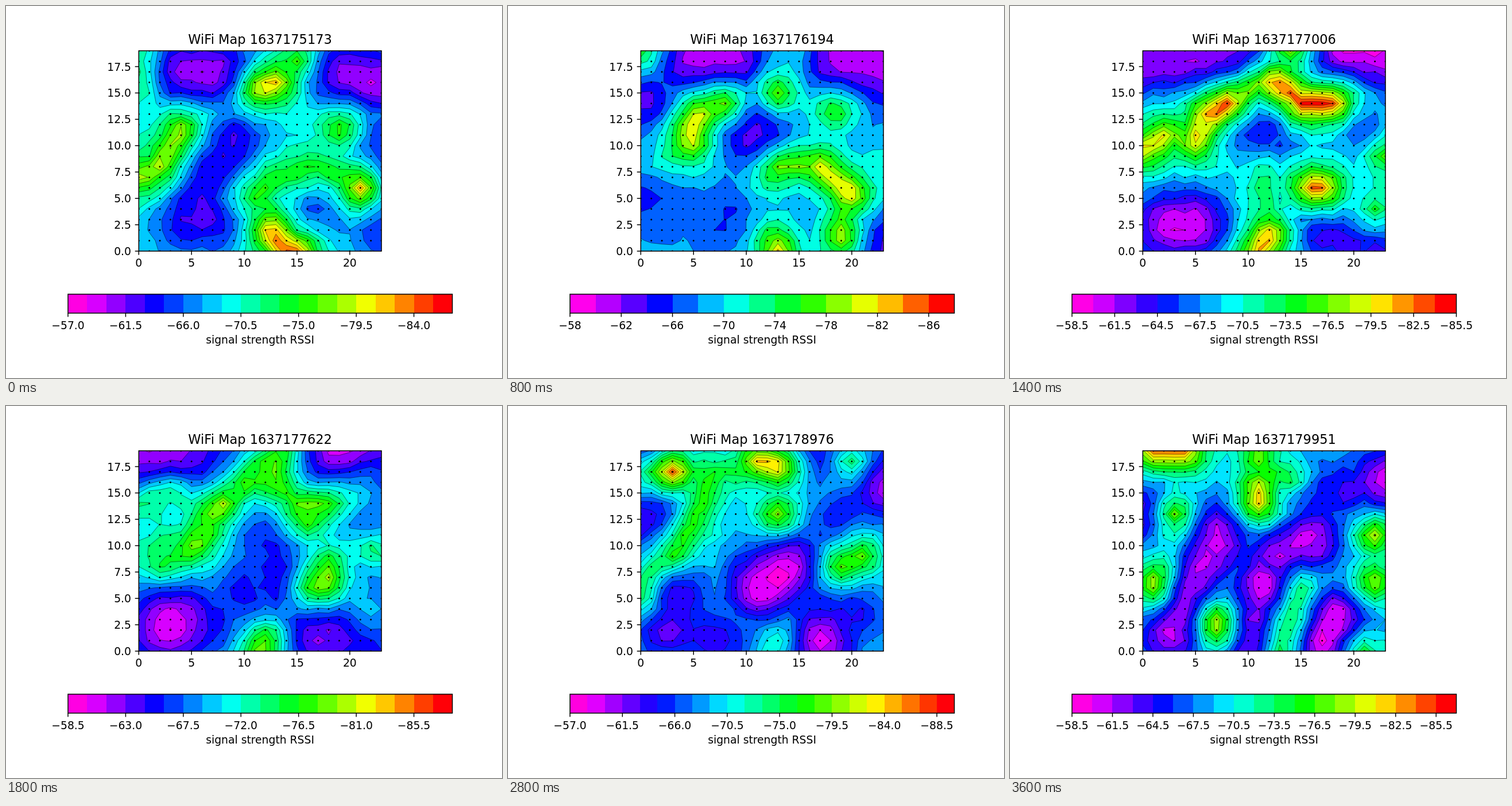
Write an HTML page that moves like this. It is 864x648 px and loops after 3800 ms.

```html
<!DOCTYPE html>
<html lang="en">
<head>
<meta charset="utf-8">
<title>WiFi Map</title>
<style>
  html, body { margin: 0; width: 100%; height: 100%; overflow: hidden; background: #fff; }
  svg { display: block; width: 100vw; height: 100vh; font: 18.75px "DejaVu Sans", sans-serif; }
  .line { fill: none; stroke: #000; stroke-width: 1.5; }
  .contour { fill: none; stroke: #000; stroke-width: 0.5; }
  .dots { fill: none; stroke: #000; stroke-width: 3; stroke-linecap: round; }
  .title { font-size: 22.5px; }
</style>
</head>
<body>
<svg viewBox="0 0 864 648">
  <clipPath id="plot"><rect x="231.3" y="78" width="422.7" height="349"/></clipPath>
  <g id="map" clip-path="url(#plot)"></g>
  <g id="axes"></g>
  <g id="legend"></g>
</svg>
<script>
const COLS = 24, ROWS = 20, STEP_MS = 200, STEPS = 19;
const BASE = 69, RIPPLE = 0.7;
const BAR = { x: 108, y: 502, w: 669.5, h: 33 };
const px = x => 231.3 + x * 18.378;
const py = y => 427 - y * 18.368;

// Colour bands: weakest loss, width of a band, number of bands
const scale = (low, width, count) => ({ low, width, count });
const coarse = scale(57, 1.5, 20), wide = scale(58.5, 1.5, 19), even = scale(58.5, 1.5, 18);
const scales = [
  coarse, coarse, scale(58, 2, 17), scale(58, 2, 16), scale(58, 2, 15), scale(57, 1.5, 19), coarse,
  even, scale(58.5, 1.5, 21), scale(58.5, 1.5, 20), even, wide, even, even,
  scale(57, 1.5, 22), wide, wide, wide, wide
];

// A stroke is a ridge or a basin: its loss in dB, then the points of its spine
const keys = [
  key(0, 1637175173,
    [82, 11.5,15.5, 13,16], [79, 0,7, 2,8, 4,11.5], [77, 19,11.5], [75, 11,5, 13,7, 17,8, 20,7],
    [83, 21,6], [84, 12.5,2, 14,0, 15,0], [76, 15,18], [72, 0,19, 0,15],
    [60, 4,17, 8,17], [60, 19,17, 23,16], [62.5, 9,10.5, 6,7, 5,3, 7,3], [65, 17,4], [64, 23,11, 23,2]),
  key(2, 1637175707,
    [79, 1,8, 3.5,9.5, 6,13, 8,14], [80, 13,15], [79, 19,13], [78, 12,7, 14,8, 17,8, 20,6],
    [84, 20,6], [89, 19,1], [84, 13,0, 12.5,1.5], [78, 0,19], [78, 15,19],
    [61, 4,17.5, 8,17.5], [61, 19,18, 23,15], [64, 0,13, 2,14], [62.5, 9,12, 11.5,11],
    [63, 2,4, 8,2.5], [64.5, 17,4], [64, 22.5,11], [64, 23,2]),
  key(5, 1637176437,
    [84, 5,10.3, 4.5,11.5, 5.5,13], [79, 6,13.5, 8,14], [78, 13,15], [77, 18,13.5],
    [79, 13,8, 17,8.5], [84, 17,8, 19,6, 20,5], [79, 19,4, 19,2], [82, 13,0], [74, 23,9], [75, 0,19],
    [60, 5,18.5, 9,18.5], [59.5, 18,18.5, 23,18], [62, 0,14.5], [62, 11,12, 10.5,10.5],
    [64, 0,6.5], [62, 23,0.5], [66.5, 9,3]),
  key(7, 1637177006,
    [84, 6.5,13, 8,14], [81, 5,10.5, 6,13], [80.5, 0,9.5, 2,11], [77, 8,14, 11,16],
    [83, 12.5,16, 14,15], [84.5, 15,14, 18,14], [83, 16,6, 17,6], [82, 11,0, 12,1.5],
    [73, 11.5,2, 11.5,7], [74, 22,4], [76, 23,9], [77, 14,19],
    [61.5, 0,18, 9,18.5], [60, 19,19, 23,18.5], [64, 10,12, 12,11.5], [60, 2.5,2.5, 5,2.5],
    [63.5, 17,1.5, 22,0], [65, 20.5,12]),
  key(11, 1637178237,
    [80, 0,14, 3,15.3], [82, 10,16.5, 11,18], [84.5, 12,18, 13,18], [80, 2.5,8, 4,9, 6,10, 7,11],
    [77, 7,11, 8,14], [81, 16,12], [84.5, 18,7, 18,8.5], [76, 19,9.5, 22,10], [78.5, 12,0], [72, 20,14, 22,17],
    [60, 1,19, 3,19], [61, 17,19, 20,19], [64, 0.5,11], [59, 11,5.5, 13,7], [60, 3,4, 2.5,2],
    [61.5, 16,1, 18,2], [65.5, 8,2], [66, 22,3, 23,13]),
  key(14, 1637178976,
    [88, 3,17], [76, 1,17, 9,17], [85, 11,18, 13,17.5], [78, 3,9, 5,12, 6.5,16], [81, 13,13],
    [79, 19,8, 21,9], [75, 0,5, 0.5,7, 2,8.5], [74, 20,18], [72, 12,0, 13,1],
    [63, 0,19], [64, 17,19], [59.5, 23,16], [63, 0,12, 2,13], [58, 11.5,6, 14,8], [61.5, 3,6, 2.5,2.5],
    [58.5, 17,1], [64, 17,4, 20,4], [64, 6,1, 9,1], [65, 17,12, 21,14]),
  key(18, 1637179951,
    [84.5, 1,19, 4,19], [79, 11,18.5], [82, 11,14, 11,15.5], [75, 11,17, 14,16.5], [78, 3,13],
    [71, 3,11, 2,8], [79, 1,6, 1,7], [79, 7,2, 7,3], [74, 13,0, 14,3, 15,6], [80, 22,11], [80, 22,6.5], [75, 21,0],
    [62, 0,13], [60, 23,16], [60, 7,11, 5,8, 3,2], [58.5, 12,6], [60.5, 13,9, 16,10.5],
    [61, 10.5,3, 10.5,0], [58.5, 18,3, 17,1], [64, 16,15, 20,15])
];

function key(step, stamp, ...strokes) {
  const field = Array.from({ length: COLS * ROWS }, (_, i) =>
    loss(i % COLS, Math.floor(i / COLS), strokes) + RIPPLE * (2 * random(i + 500 * step) - 1));
  return { step, stamp, field };
}

function random(seed) {
  const v = Math.sin(seed * 12.9898) * 43758.5453;
  return v - Math.floor(v);
}

function distance(x, y, path) {
  let best = Math.hypot(x - path[0], y - path[1]);
  for (let i = 0; i + 3 < path.length; i += 2) {
    const [ax, ay, bx, by] = path.slice(i, i + 4);
    const dx = bx - ax, dy = by - ay;
    const t = Math.max(0, Math.min(1, ((x - ax) * dx + (y - ay) * dy) / (dx * dx + dy * dy)));
    best = Math.min(best, Math.hypot(x - ax - t * dx, y - ay - t * dy));
  }
  return best;
}

// Ridges are narrow and sharp, basins broad and round; basins fade out near a ridge
function loss(x, y, strokes) {
  let lift = 0, dip = 0, near = 0;
  for (const [level, ...path] of strokes) {
    const d = distance(x, y, path), height = level - BASE;
    if (height > 0) {
      const f = Math.exp(-((d / 1.8) ** 1.4));
      lift = Math.max(lift, height * f);
      near = Math.max(near, f);
    } else {
      dip = Math.min(dip, height * Math.exp(-((d / 3.2) ** 2)));
    }
  }
  return BASE + lift + (1 - near) * dip;
}

// Area at or above a level, and the line along its border
function contour(field, level) {
  let area = "", edge = "";
  for (let y = 0; y < ROWS - 1; y++)
    for (let x = 0; x < COLS - 1; x++) {
      const corners = [[x, y], [x + 1, y], [x + 1, y + 1], [x, y + 1]]
        .map(([cx, cy]) => ({ x: cx, y: cy, z: field[cy * COLS + cx] - level }));
      const shape = [], cuts = [];
      corners.forEach((a, i) => {
        const b = corners[(i + 1) % 4];
        if (a.z >= 0) shape.push(at(a.x, a.y));
        if (a.z >= 0 !== b.z >= 0) {
          const t = a.z / (a.z - b.z);
          const cut = at(a.x + t * (b.x - a.x), a.y + t * (b.y - a.y));
          shape.push(cut);
          cuts.push(cut);
        }
      });
      if (!shape.length) continue;
      area += "M" + shape.join("L") + "Z";
      if (corners[0].z < 0) cuts.push(cuts.shift());
      for (let i = 0; i + 1 < cuts.length; i += 2) edge += `M${cuts[i]}L${cuts[i + 1]}`;
    }
  return { area, edge };
}
function at(x, y) { return px(x).toFixed(2) + " " + py(y).toFixed(2); }

// Rainbow from red to magenta, run backwards
const stops = [
  [0, 255, 0, 41], [0.03, 255, 0, 0], [0.215, 255, 255, 0], [0.4, 0, 255, 0],
  [0.586, 0, 255, 255], [0.77, 0, 0, 255], [0.954, 255, 0, 255], [1, 255, 0, 191]
];
function bandColor(i, count) {
  const t = 1 - (i + 0.5) / count;
  const k = stops.findIndex(s => s[0] >= t), a = stops[k - 1], b = stops[k];
  const f = (t - a[0]) / (b[0] - a[0]);
  return `rgb(${[1, 2, 3].map(c => Math.round(a[c] + f * (b[c] - a[c])))})`;
}

const text = (x, y, s, anchor = "middle", cls = "") =>
  `<text x="${x}" y="${y}" text-anchor="${anchor}" class="${cls}">${s}</text>`;
const line = d => `<path class="line" d="${d}"/>`;
const byId = id => document.getElementById(id);

let dotPath = "";
for (let i = 0; i < COLS * ROWS; i++) dotPath += `M${at(i % COLS, Math.floor(i / COLS))}h0.01`;

function drawAxes() {
  let out = line("M231.3 78H654V427H231.3Z");
  for (let x = 0; x <= 20; x += 5)
    out += line(`M${px(x)} 427v6.6`) + text(px(x), 454, x);
  for (let y = 0; y <= 17.5; y += 2.5)
    out += line(`M231.3 ${py(y)}h-6.6`) + text(218, py(y) + 7, y.toFixed(1), "end");
  byId("axes").innerHTML = out + text(442.6, 588, "signal strength RSSI");
}

function drawMap(field, { low, width, count }) {
  let out = `<rect x="231" y="78" width="423" height="349" fill="${bandColor(0, count)}"/>`;
  let edges = "";
  for (let i = 1; i < count; i++) {
    const { area, edge } = contour(field, low + i * width);
    out += `<path d="${area}" fill="${bandColor(i, count)}"/>`;
    edges += edge;
  }
  byId("map").innerHTML = out +
    `<path class="contour" d="${edges}"/><path class="dots" d="${dotPath}"/>`;
}

function drawLegend(stamp, { low, width, count }) {
  const cell = BAR.w / count, every = 1 + Math.floor(count / 10);
  const digits = Number.isInteger(low) && Number.isInteger(every * width) ? 0 : 1;
  let out = text(442.6, 66, "WiFi Map " + stamp, "middle", "title");
  for (let i = 0; i < count; i++)
    out += `<rect x="${BAR.x + i * cell}" y="${BAR.y}" width="${cell}" height="${BAR.h}"
      fill="${bandColor(i, count)}" shape-rendering="crispEdges"/>`;
  for (let i = 0; i <= count; i += every) {
    const x = BAR.x + i * cell;
    out += line(`M${x} 535v6.6`) + text(x, 563, "−" + (low + i * width).toFixed(digits));
  }
  byId("legend").innerHTML = out + line(`M${BAR.x} ${BAR.y}h${BAR.w}v${BAR.h}h${-BAR.w}Z`);
}

function drawStep(step) {
  const next = Math.max(1, keys.findIndex(k => k.step >= step));
  const a = keys[next - 1], b = keys[next];
  const t = (step - a.step) / (b.step - a.step);
  const mix = (p, q) => p + t * (q - p);
  drawMap(a.field.map((z, i) => mix(z, b.field[i])), scales[step]);
  drawLegend(Math.round(mix(a.stamp, b.stamp)), scales[step]);
}

let shown = -1;
function tick() {
  const step = Math.floor(performance.now() / STEP_MS) % STEPS;
  if (step !== shown) drawStep(shown = step);
  requestAnimationFrame(tick);
}
drawAxes();
tick();
</script>
</body>
</html>
```
